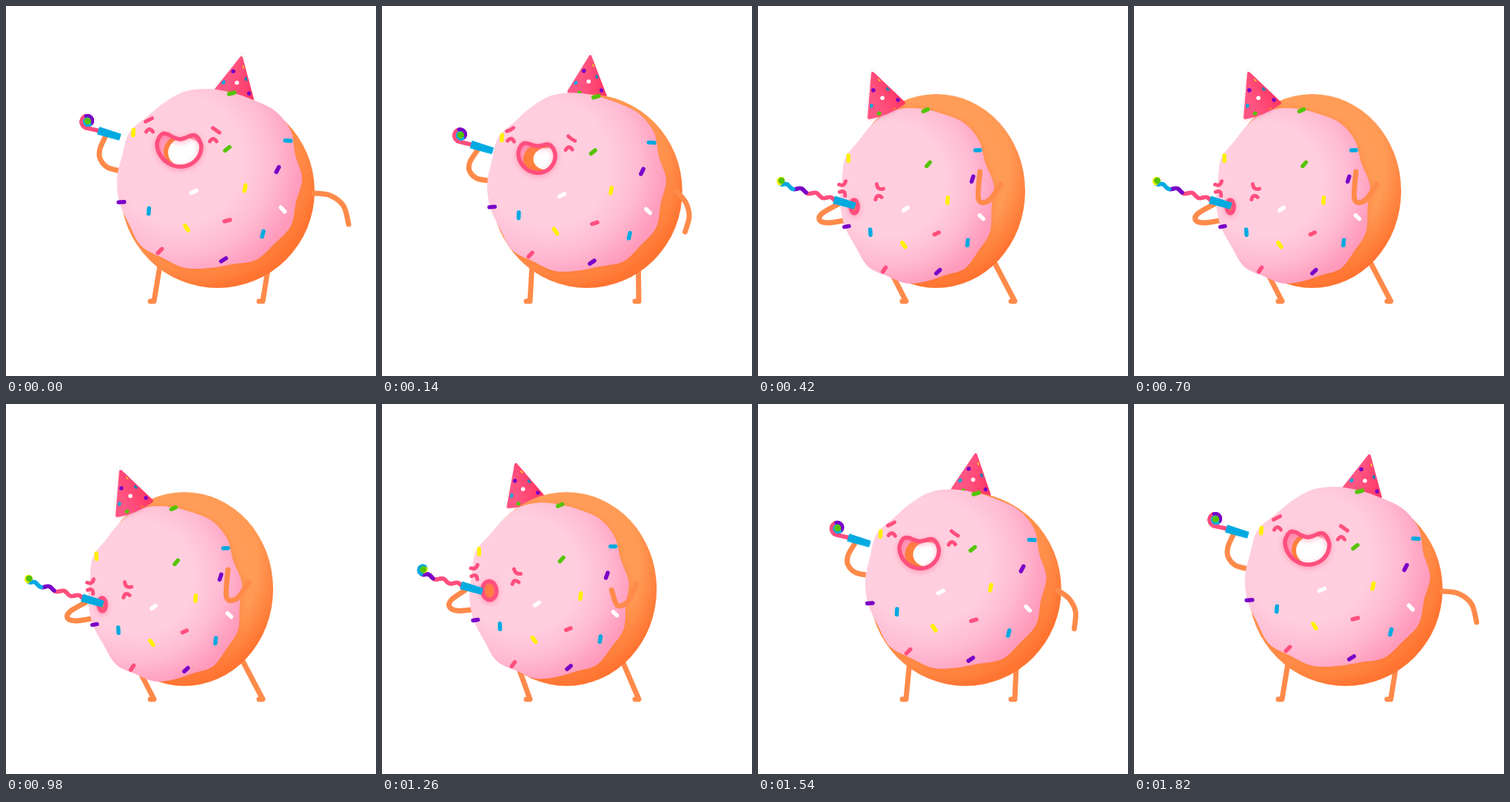
Recreate the animation shown at these times as an HTML page with a canvas. Size 500 px wide and 500 px high, loop 1890 ms.

```html
<!DOCTYPE html>
<html lang="en">
<head>
<meta charset="utf-8">
<title>Party donut</title>
<style>
html, body { margin: 0; width: 100%; height: 100%; overflow: hidden; background: #fff; }
canvas { display: block; width: 100vmin; height: 100vmin; }
</style>
</head>
<body>
<canvas id="stage" width="500" height="500"></canvas>
<script>
const ctx = document.getElementById('stage').getContext('2d');
const LOOP = 1890, STEP = 70, TAU = Math.PI * 2;
const PINK = '#ff4f7e', ORANGE = '#ff8a4a', BLUE = '#00aae0', PURPLE = '#7a00c8',
      GREEN = '#55c400', YELLOW = '#fff000', WHITE = '#fff';

// Icing radius at equal angles, clockwise from the right
const ICING = [126, 122, 128, 125, 127, 120, 121, 125, 124, 129, 124, 125,
               124, 121, 124, 118, 119, 122, 121, 120, 122, 128, 128, 121];
// x, y from the icing's centre, angle in degrees
const SPRINKLES = [
  [GREEN, 31, -115, -15], [GREEN, 25, -40, -38], [BLUE, 107, -51, 4],
  [PURPLE, 93, -12, -62], [YELLOW, 49, 13, -78], [WHITE, -20, 18, -25],
  [WHITE, 100, 42, 46], [BLUE, 73, 75, -75], [PINK, 25, 57, -15],
  [YELLOW, -30, 67, 57], [BLUE, -81, 44, -86], [PURPLE, -118, 32, -3],
  [PINK, -66, 98, -45], [PURPLE, 20, 110, -32], [YELLOW, -102, -62, -85]
];
// Share of the hat's left and right sides
const HAT_DOTS = [
  [YELLOW, -.03, .24], [PURPLE, .34, .06], ['#0085bd', .01, .5], [PURPLE, .05, .82],
  [WHITE, .32, .35], [BLUE, .71, .03], [GREEN, .71, .29], ['#ff9d00', .32, .75]
];
const STRIP = [[PINK, 40], [PURPLE, 18], [BLUE, 20], [YELLOW, 14], [GREEN, 15]];
const STRIP_LEN = STRIP.reduce((n, s) => n + s[1], 0);

const clamp = v => Math.min(1, Math.max(0, v));
const mix = (a, b, k) => a + (b - a) * k;
const rad = deg => deg * Math.PI / 180;
const easeQuad = x => x < .5 ? 2 * x * x : 1 - 2 * (1 - x) ** 2;
const easeCubic = x => x < .5 ? 4 * x ** 3 : 1 - 4 * (1 - x) ** 3;
const span = (t, start, len) => clamp((t - start) / len);
const range = n => Array.from({ length: n }, (_, i) => i);

// Each entry is x, y laughing and x, y blowing.
const pose = (k, ...list) => list.map(([x, y, u, v]) => [mix(x, u, k), mix(y, v, k)]);

// The icing's turn: a slight roll with foreshortening
function turn(p) {
  return (x, y) => [
    mix(274, 214, p) + mix(1, .83, p) * x + .116 * p * y,
    mix(233, 255, p) - .103 * p * x + mix(1, .964, p) * y
  ];
}

// Smooth curve through the points
function curve(pts, closed) {
  const n = pts.length;
  const at = i => closed ? pts[(i + n) % n] : pts[Math.min(n - 1, Math.max(0, i))];
  ctx.beginPath();
  ctx.moveTo(...pts[0]);
  for (let i = 0; i < (closed ? n : n - 1); i++) {
    const [a, b, c, d] = [at(i - 1), at(i), at(i + 1), at(i + 2)];
    ctx.bezierCurveTo(b[0] + (c[0] - a[0]) / 6, b[1] + (c[1] - a[1]) / 6,
                      c[0] - (d[0] - b[0]) / 6, c[1] - (d[1] - b[1]) / 6, c[0], c[1]);
  }
  if (closed) ctx.closePath();
}

function stroke(color, width) {
  ctx.strokeStyle = color;
  ctx.lineWidth = width;
  ctx.stroke();
}

function line(color, width, ...pts) {
  ctx.beginPath();
  pts.forEach(p => ctx.lineTo(...p));
  stroke(color, width);
}

function ellipse(x, y, rx, ry, fill) {
  ctx.beginPath();
  ctx.ellipse(x, y, rx, ry, 0, 0, TAU);
  ctx.fillStyle = fill;
  ctx.fill();
}

function radial(x, y, r0, r1, ...stops) {
  const g = ctx.createRadialGradient(x, y, r0, x, y, r1);
  stops.forEach((c, i) => g.addColorStop(i / (stops.length - 1), c));
  return g;
}

function shadow(color, blur, y) {
  ctx.shadowColor = color;
  ctx.shadowBlur = blur;
  ctx.shadowOffsetY = y;
}

function legs(p) {
  const hips = pose(p, [208, 351, 181, 362], [354, 355, 316, 340]);
  hips.forEach((hip, i) => {
    const x = 200 + 147 * i;
    line(ORANGE, 7, hip, [x, 399], [x - 5, 399]);
  });
}

function leftArm(p) {
  curve(pose(p, [155, 223, 116, 290], [137, 218, 94, 293], [127, 206, 83, 289],
                [127, 193, 87, 280], [134, 177, 108, 268]));
  stroke(ORANGE, 7);
}

function rightArm(p, q) {
  const arm = pose(p, [416, 253, 328, 241], [438, 256, 312, 263],
                      [456, 270, 298, 261], [463, 295, 300, 224]);
  curve(arm.map(([x, y], i) => {
    const k = i / 3;
    return [x - 130 * k * k * q, y + mix(170, 80, p) * k * q];
  }));
  stroke(ORANGE, 7);
}

function hat(p, dx, dy, front) {
  ctx.save();
  ctx.translate(dx, dy);
  const [a, l, r] = pose(p, [318, 70, 155, 91], [283, 114, 150, 151], [333, 126, 197, 131]);
  const mx = (l[0] + r[0]) / 2, my = (l[1] + r[1]) / 2;
  const g = ctx.createLinearGradient(...l, ...r);
  g.addColorStop(.3, '#ff5583');
  g.addColorStop(1, '#ff3763');
  ellipse(a[0] + 1, a[1] - 4, 3, 3, WHITE);
  stroke('#f3e6ea', .7);
  ctx.beginPath();
  ctx.moveTo(...a);
  ctx.lineTo(...l);
  ctx.quadraticCurveTo(mx + (mx - a[0]) * .12, my + (my - a[1]) * .12, ...r);
  ctx.closePath();
  if (front) shadow('rgba(235,70,115,.45)', 6, 2);
  ctx.fillStyle = g;
  ctx.fill();
  shadow('transparent', 0, 0);
  stroke(g, 4);
  ctx.clip();
  for (const [c, u, v] of HAT_DOTS) {
    ellipse(a[0] + (l[0] - a[0]) * u + (r[0] - a[0]) * v,
            a[1] + (l[1] - a[1]) * u + (r[1] - a[1]) * v, 2.8, 2.8, c);
  }
  ctx.restore();
}

function dough(p) {
  const x = mix(286, 241, p);
  ellipse(x, 250, mix(131, 120, p), 131,
          radial(x - 30, 215, 90, 168, '#ff9e59', '#ff9a54', '#ff7431'));
}

function icing(p, at) {
  const pts = ICING.map((r, i) => {
    const a = i / ICING.length * TAU;
    return at(r * Math.cos(a), r * Math.sin(a));
  });
  const fill = radial(...at(-40, -25), mix(85, 75, p), mix(168, 150, p),
                      '#ffcfdf', '#ffbbd3', '#ff9abb');
  // The dough's path is still current: keep the shadow on it.
  ctx.save();
  ctx.clip();
  shadow('rgba(255,105,40,.5)', 12, 2);
  curve(pts, true);
  ctx.fillStyle = fill;
  ctx.fill();
  ctx.restore();
  ctx.fillStyle = fill;
  ctx.fill();
}

function sprinkles(at) {
  for (const [c, x, y, deg] of SPRINKLES) {
    const ux = Math.cos(rad(deg)) * 3.8, uy = Math.sin(rad(deg)) * 3.8;
    line(c, 5.5, at(x - ux, y - uy), at(x + ux, y + uy));
  }
}

// Short bent stroke for brows and eyes
function mark([x, y], tilt, half, bend) {
  const ux = Math.cos(rad(tilt)), uy = Math.sin(rad(tilt));
  ctx.beginPath();
  ctx.moveTo(x - ux * half, y - uy * half);
  ctx.quadraticCurveTo(x - uy * bend, y + ux * bend, x + ux * half, y + uy * half);
  stroke(PINK, 5);
}

function face(p) {
  const [browL, browR, eyeL, eyeR] = pose(p, [193, 154, 114, 239], [284, 168, 165, 244],
                                             [194, 170, 114, 254], [280, 183, 163, 260]);
  mark(browL, -27, 5, 6 * p);
  mark(browR, 35, 5.5, 6 * p);
  mark(eyeL, 35 * p, 4.5, -7);
  mark(eyeR, -20 * p, 4.5, -7);
}

// A wide grin that shrinks to a round, blowing mouth
function mouth(p) {
  const [c, orange, hole] = pose(p, [234, 188, 130, 271], [237, 197, 131, 271], [242, 198, 160, 262]);
  const w = mix(30, 5, p), h = mix(29, 9, p), round = clamp(p * 1.2);
  const ring = range(24).map(i => {
    const a = i / 24 * TAU, s = Math.sin(a);
    const grin = s > 0 ? s : .28 * s - .3 * Math.sin(2 * a) ** 2;
    const x = w * Math.cos(a);
    return [c[0] + x, c[1] + h * mix(grin, s, round) + .06 * x];
  });
  const open = clamp(1 - 1.3 * p);
  ctx.save();
  curve(ring, true);
  ctx.clip();
  ctx.fillStyle = '#ff9dbb';
  ctx.fill();
  ellipse(...orange, mix(24, 9, p), mix(23, 12, p), '#ff803c');
  if (open) ellipse(...hole, 23 * open, 20 * open, WHITE);
  ctx.restore();
  ctx.save();
  shadow('rgba(255,90,140,.5)', 7, 2);
  curve(ring, true);
  stroke(PINK, 5.5);
  ctx.restore();
}

// The strip runs straight for the given length; the rest is rolled up.
function blower(p, out) {
  const [m, e] = pose(p, [125, 168.5, 103, 262], [154, 177, 131, 270]);
  const tilt = mix(.22, .29, p), pitch = 4.8;
  const d = [-Math.cos(tilt), -Math.sin(tilt)], n = [Math.sin(tilt), -Math.cos(tilt)];
  const amp = 2 * clamp((out - 17) / 17);
  let r = Math.sqrt((STRIP_LEN - out) * pitch / Math.PI) - pitch / 2;
  const cx = m[0] + d[0] * out + n[0] * r, cy = m[1] + d[1] * out + n[1] * r;
  let angle = Math.PI / 2 + tilt, s = 0, last = m;
  for (const [color, len] of STRIP) {
    for (let i = 0; i < len; i++, s++) {
      let q;
      if (s < out) {
        const wave = amp * Math.sin(s * .3) * clamp((out - s) / 6);
        q = [m[0] + d[0] * s + n[0] * wave, m[1] + d[1] * s + n[1] * wave];
      } else {
        q = [cx + Math.cos(angle) * r, cy + Math.sin(angle) * r];
        angle += 1 / r;
        r = Math.max(1.5, r - pitch / (TAU * r));
      }
      line(color, 5.3, last, q);
      last = q;
    }
  }
  const len = Math.hypot(e[0] - m[0], e[1] - m[1]);
  const px = -(e[1] - m[1]) / len, py = (e[0] - m[0]) / len;
  const corner = (c, k) => [c[0] + px * k, c[1] + py * k];
  ctx.beginPath();
  [corner(m, 5), corner(m, -5), corner(e, -4), corner(e, 4)].forEach(c => ctx.lineTo(...c));
  ctx.closePath();
  ctx.fillStyle = BLUE;
  ctx.fill();
  stroke(BLUE, 1);
}

function draw(t) {
  const p = easeCubic(span(t, 0, 380)) - easeQuad(span(t, 1070, 630));
  const out = 17 + 59 * (easeQuad(span(t, 185, 250)) - easeQuad(span(t, 1100, 380)));
  const q = p * (1 - p), front = p > .87, at = turn(p);
  const dx = -25 * q, dy = -26 * q;
  ctx.fillStyle = WHITE;
  ctx.fillRect(0, 0, 500, 500);
  ctx.lineCap = ctx.lineJoin = 'round';
  legs(p);
  leftArm(p);
  if (!front) hat(p, dx, dy - 10 * q, false);
  dough(p);
  icing(p, at);
  if (front) hat(p, dx, dy - 10 * q, true);
  sprinkles(at);
  ctx.save();
  ctx.translate(dx, dy);
  face(p);
  mouth(p);
  ctx.restore();
  rightArm(p, q);
  blower(p, out);
}

const begin = performance.now();
function tick() {
  const t = (performance.now() - begin) % LOOP;
  draw(Math.floor(t / STEP) * STEP);
  requestAnimationFrame(tick);
}
tick();
</script>
</body>
</html>
```
